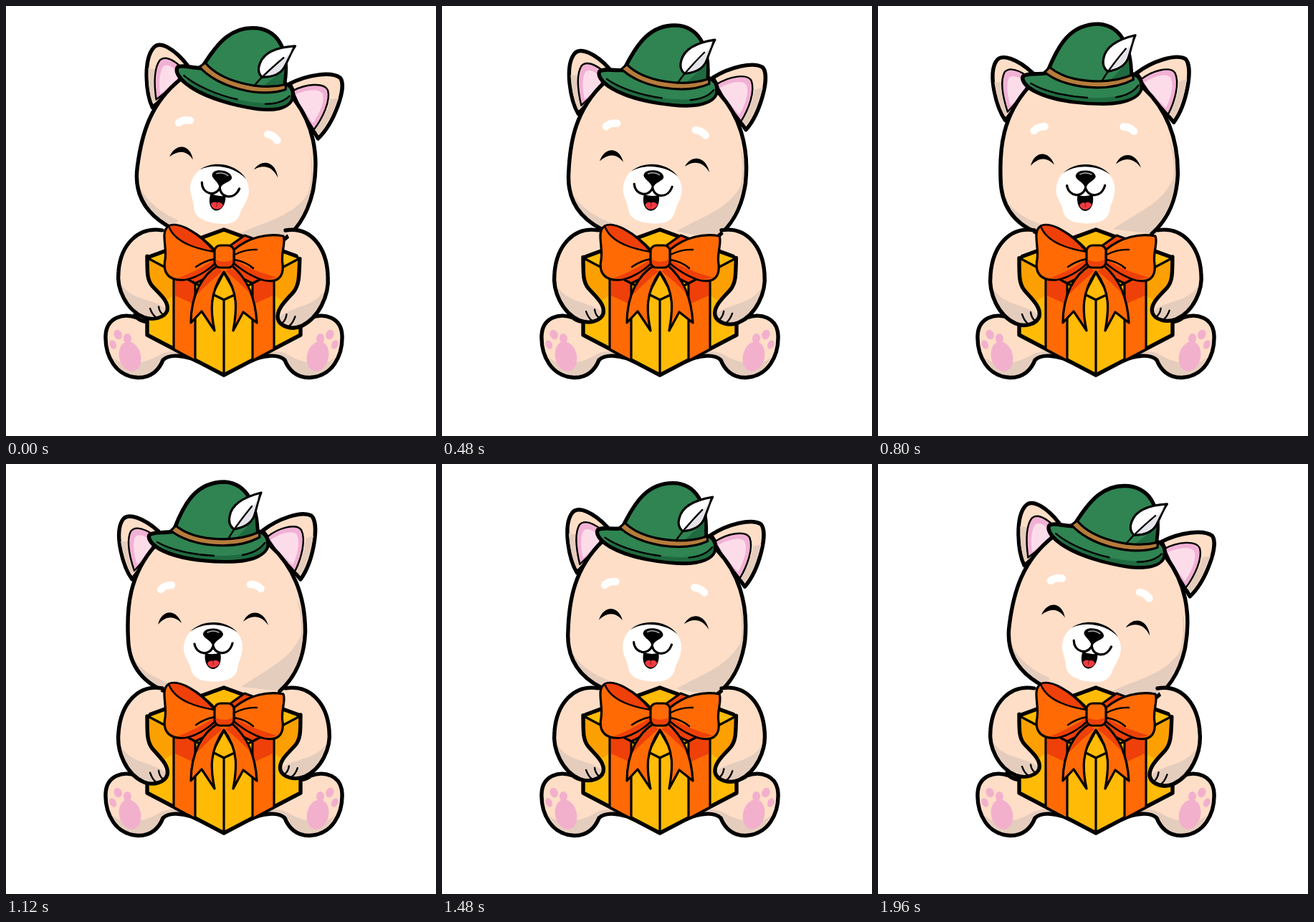
Animation, 600 px wide and 600 px high, one loop 2 s. Source, as an HTML page:

```html
<!DOCTYPE html>
<html lang="en">
<meta charset="utf-8">
<title>Bear with a gift</title>
<style>
html, body { margin: 0; width: 100%; height: 100%; overflow: hidden; background: #fff; }
svg { display: block; width: 100vw; height: 100vh; }
path, ellipse, rect { stroke-linecap: round; stroke-linejoin: round; }
.o { stroke: #000; stroke-width: 5.4; }
.i { stroke: #000; stroke-width: 3.2; }
.l { stroke: #000; stroke-width: 2.4; fill: none; }
.skin { fill: #ffdec7; }
.shade { fill: #e5cdbd; }
.pink { fill: #f1b1d4; }
.blush { fill: #fddcea; }
.pad { fill: #f2b0cd; }
.green { fill: #2f8452; }
.dark { fill: #1f6a40; }
.gold { fill: #ffbb05; }
.amber { fill: #fba000; }
.orange { fill: #ff6a05; }
.red { fill: #ee4008; }
.none { fill: none; }
</style>
<svg viewBox="0 0 600 600">
  <defs>
    <g id="foot">
      <path class="skin" d="M183 435C164 428 140 434 139 460C138 488 153 517 184 518.500C203 519 214 507 219 494C228 485 250 487 268 496L300 490L240 440Z"/>
      <path class="shade" d="M149 490C165 506 195 498 214 487C224 481 240 480 252 487L266 494C245 487 228 486 219 494C214 507 203 518 184 518C167 516 155 504 149 490Z"/>
      <path class="o none" d="M183 435C164 428 140 434 139 460C138 488 153 517 184 518.500C203 519 214 507 219 494C228 485 250 487 268 496M180 431C183 437 189 439 197 441"/>
      <g class="pad">
        <ellipse cx="173" cy="489" rx="15" ry="21" transform="rotate(-14 173 489)"/>
        <ellipse cx="149" cy="472.500" rx="4.500" ry="6.500" transform="rotate(-25 149 472)"/>
        <ellipse cx="156" cy="458.500" rx="5.500" ry="7" transform="rotate(-22 156 458)"/>
        <ellipse cx="169.500" cy="464" rx="5.500" ry="7" transform="rotate(-5 169 464)"/>
      </g>
    </g>
    <g id="arm">
      <path class="skin" d="M218 313C184 307 160 335 157 375C154 402 168 433 192 444C206 450 222 444 225 434C228 420 213 408 204 397C197 388 197 378 197 352Z"/>
      <path class="shade" d="M159 392C172 414 190 415 203 421C213 424 221 428 225 434C222 444 206 450 192 444C175 436 163 416 159 392Z"/>
      <path class="o none" d="M218 313C184 307 160 335 157 375C154 402 168 433 192 444C206 450 222 444 225 434C228 420 213 408 204 397C197 388 197 378 197 352"/>
      <path class="l" d="M201 431Q204 440 209 444M213 428Q214 436 219 440"/>
    </g>
  </defs>

  <path class="skin" d="M215 314H393L438 400L428 440H182L170 400Z"/>
  <use href="#foot"/>
  <use href="#foot" transform="matrix(-1 0 0 1 608 0)"/>

  <g id="head">
    <!-- ears -->
    <path class="skin o" d="M176 161C163 143 151 98 162 79C169 66 193 76 213 94L200 130Z"/>
    <path class="shade" d="M160 108Q165 138 175 155L181 148Q172 130 170 108Z"/>
    <path class="pink l" d="M179 149C172 128 168 106 174 94C181 85 196 92 208 100L203 122Z"/>
    <path class="blush" d="M183 140C177 122 177 106 181 101C187 96 198 103 206 108L200 122Z"/>
    <path class="skin o" d="M358 93C380 76 412 65 426 72C438 83 429 136 411 161L385 130Z"/>
    <path class="shade" d="M429 100Q424 132 411 155L403 149Q416 130 418 104Z"/>
    <path class="pink l" d="M364 102C380 89 405 82 412 92C419 106 412 132 403 150L380 125Z"/>
    <path class="blush" d="M369 106C382 97 401 91 406 99C411 110 406 128 400 141L380 122Z"/>
    <!-- face -->
    <path class="skin" d="M235 322C195 310 172 285 170.500 245C168 200 172 155 208 114Q290 70 369 114C399 141 418 182 417.500 235C416 270 405 296 382 317Z"/>
    <path class="shade" d="M404 185C412 205 413 228 411 240C395 275 365 285 328 311L382 317C405 296 416 270 417.500 235Q416 205 404 185Z"/>
    <path class="shade" d="M177 270Q195 298 240 309L235 322C205 313 184 296 177 270Z"/>
    <path class="o none" d="M235 322C195 310 172 285 170.500 245C168 200 172 155 208 114Q290 70 369 114C399 141 418 182 417.500 235C416 270 405 296 382 317"/>
    <path d="M216 175Q221 169 231 169M341 168Q350 168 355.500 174" fill="none" stroke="#fff" stroke-width="10.500"/>
    <path d="M212 224C217 203 237 201 245 222C234 211 223 212 212 224ZM331 220C339 202 359 203 366 225C356 211 343 210 331 220Z"/>
    <path fill="#fff" d="M289 222C262 222 248 238 248 258C248 269 256 276 258 286C261 300 274 303.500 291 303.500C309 303 320 299 323 286C324 275 330 268 330 255C330 238 315 222 289 222Z"/>
    <path d="M257 234C273 217 306 216 323 235C305 221 274 221 257 234Z"/>
    <path d="M289 229.500C298 229.500 303 234 303 238C302 243 293 246 291 251H287C285 246 276 243 275 238C275 233 280 229.500 289 229.500Z"/>
    <path d="M281 235Q289 231 297 235" fill="none" stroke="#aaa" stroke-width="1.600"/>
    <path class="i none" d="M263 251C266 267 285 268 289 254C293 268 312 267 316 250M289 246V255"/>
    <path d="M278 264Q289 267 299 263C302 277 296 286 289 286C282 286 276 277 278 264Z"/>
    <path fill="#ee3b41" d="M281 278Q284 273 289 275Q294 272 298 277C296 282 293 284 289 284C285 284 282 282 281 278Z"/>
    <path d="M289 275V280" stroke="#a51e28" stroke-width="1.300"/>
    <!-- hat -->
    <path class="green o" d="M235 94C218 97 207 94 200 99C195 110 222 135 305 136C348 137 369 124 365 105Q362 95 352 94Z"/>
    <path class="dark" d="M214 113C245 125 275 129 306 128C338 127 355 120 363 110C366 123 348 134 305 134C262 134 228 124 214 113Z"/>
    <path class="l" d="M211 109C230 120 262 127 290 128M330 127Q352 123 361 110"/>
    <path class="green o" d="M235 90C248 57 264 25 305 25C336 27 351 57 351 99Q290 124 235 90Z"/>
    <path class="dark" d="M347 70L349 96L320 105C332 92 341 84 347 70Z"/>
    <path fill="#b67c3c" class="i" d="M237 86C262 107 317 111 353 95L354 102C320 121 258 116 230 93Z"/>
    <path fill="#fff" class="i" d="M356 40C336 45 315 54 312 73C310 82 314 88 318 91C330 89 341 84 346 73C350 62 351 51 356 40Z"/>
    <path fill="#e4e4ea" d="M353 45C347 58 336 72 319 89C332 87 341 81 344 73Z"/>
    <path class="l" d="M310 105C317 91 330 75 343 59"/>
  </g>

  <!-- box -->
  <path class="gold o" d="M304 312L411 351V459L304 515L197 459V351Z"/>
  <path class="amber" d="M199 355L234 373V404L199 425ZM409 355L374 373V404L409 425Z"/>
  <path class="i none" d="M198 352L304 408L410 352M304 408V514"/>
  <path class="orange i" d="M234 371L264 387V495L234 479ZM344 387L374 371V479L344 495Z"/>
  <path class="red" d="M236 374L262 388V416L236 404ZM346 388L372 374V404L346 416Z"/>
  <path class="red i" d="M234 371L292 349L318 349L374 371L344 387L304 368L264 387ZM309 337L333 320L349 326L322 344Z"/>
  <path class="gold i" d="M304 372L288 402L304 410L321 402Z"/>

  <g id="armL"><use href="#arm"/></g>
  <g id="armR"><use href="#arm"/></g>

  <!-- bow -->
  <path class="orange i" d="M296 362C274 375 258 403 258 442L273 426L291 453C285 425 284 400 304 371C325 400 322 425 317 453L331 427L350 442C348 404 335 379 315 362Z"/>
  <path class="red" d="M295 365C281 375 271 388 267 402C279 390 290 380 302 370ZM314 365C327 375 336 388 341 402C330 390 319 380 306 370Z"/>
  <path class="orange i" d="M292 341C269 317 241 300 227 307C215 315 225 335 222 354C218 374 229 384 249 382C268 379 284 366 292 359ZM318 340C340 322 365 317 387 321C391 331 383 344 386 360C388 379 378 386 362 383C345 379 328 367 318 359Z"/>
  <path class="red" d="M290 354C275 365 258 372 240 380L249 381C267 378 283 366 291 358ZM320 354C335 365 355 372 378 379L362 382C346 378 329 367 319 358Z"/>
  <path class="red l" d="M227 307C234 327 260 338 291 343C270 318 241 300 227 307Z"/>
  <path class="l" d="M291 353Q276 356 265 364M319 347Q335 339 350 340M319 354Q335 357 345 366"/>
  <rect class="orange i" x="291" y="334" width="27" height="31" rx="8"/>
  <path class="red" d="M293 354Q305 360 316 354V358Q315 363 310 363H299Q293 362 293 358Z"/>
</svg>
<script>
const $ = id => document.getElementById(id);
// Arms hang from the shoulder line at y = 312
const hang = (skew, scale) => `translate(0 312) matrix(1 0 ${skew} ${scale} 0 0) translate(0 -312)`;

function draw(now) {
  const phase = Math.floor(now % 2000 / 40) / 50;
  const tilt = (1 + Math.cos(phase * 2 * Math.PI)) / 2;
  $('head').setAttribute('transform', `rotate(${11 * tilt - 0.38} 294 304)`);
  $('armL').setAttribute('transform', hang(0, 1 - 0.075 * tilt));
  $('armR').setAttribute('transform', 'matrix(-1 0 0 1 608 0) ' + hang(0.03 * tilt, 0.94 + 0.08 * tilt));
  requestAnimationFrame(draw);
}
draw(performance.now());
</script>
</html>
```
